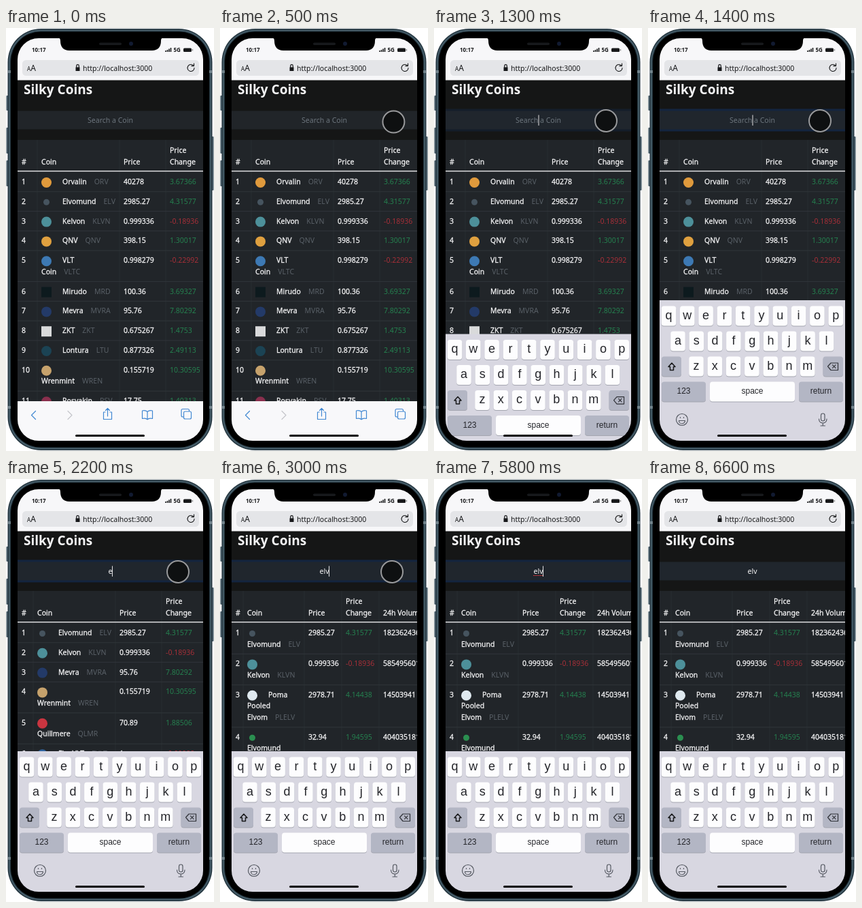
An HTML page for the animation above (6700 ms loop, 306 px wide and 620 px high).

```html
<!DOCTYPE html>
<html lang="en">
<head>
<meta charset="utf-8">
<title>Coin search on a phone</title>
<style>
  html, body { margin: 0; width: 100%; height: 100%; overflow: hidden; background: #fff; }
  svg { display: block; width: 306px; height: 620px; }
  text { font: 500 10.5px "Noto Sans", "Open Sans", sans-serif; fill: #f4f4f5; white-space: pre; }
  .title { font-size: 19px; font-weight: 600; }
  .strong { stroke: #f4f4f5; stroke-width: .28; }
  .ticker { fill: #596067; font-weight: 400; stroke: none; }
  .up { fill: #25804f; font-weight: 400; }
  .down { fill: #a52f38; font-weight: 400; }
  .ui { fill: #17181a; font-weight: 400; }
  .status { font-size: 8px; font-weight: 700; fill: #17181a; }
  .key { font: 18px "Liberation Sans", Arial, sans-serif; fill: #24252a; text-anchor: middle; }
  .label { font: 12px "Liberation Sans", Arial, sans-serif; fill: #24252a; text-anchor: middle; }
  .query { text-anchor: middle; font-weight: 400; }
  .line { fill: none; stroke-linecap: round; stroke-linejoin: round; }
</style>
</head>
<body>
<svg viewBox="0 0 306 620">
  <defs>
    <clipPath id="screen"><rect x="17" y="15" width="273" height="590" rx="31"/></clipPath>
  </defs>

  <g fill="#4a5f6a">
    <rect x="0.5" y="99" width="5" height="22" rx="1"/>
    <rect x="0.5" y="146" width="5" height="38" rx="1"/>
    <rect x="0.5" y="194" width="5" height="38" rx="1"/>
    <rect x="301" y="159" width="4.5" height="79" rx="1"/>
  </g>
  <rect x="2.5" y="1" width="301" height="618" rx="49" fill="#263842"/>
  <rect x="5" y="3.5" width="296" height="613" rx="46.5" fill="none" stroke="#4b626e" stroke-width="1.5"/>
  <path d="M3 64h4M299 64h4M3 556h4M299 556h4" stroke="#71838c" stroke-width="4"/>
  <rect x="7" y="5.5" width="292" height="609" rx="44" fill="#000"/>

  <g clip-path="url(#screen)">
    <rect x="17" y="15" width="273" height="590" fill="#151616"/>
    <text class="title" x="26" y="97">Silky Coins</text>
    <rect id="ring" x="17" y="118.5" width="273" height="33" fill="#14253f"/>
    <rect id="field" x="17" y="121.5" width="273" height="27" fill="#212529"/>
    <text id="query" class="query" x="153.5" y="139"></text>
    <path id="spelling" class="line" stroke="#d3343c" stroke-dasharray="1.5 1.5"/>
    <rect id="caret" y="127.5" width="1" height="15.5" fill="#e4e4e6"/>
    <g id="table"></g>

    <rect x="17" y="15" width="273" height="61.5" fill="#f7f7f9"/>
    <rect x="24" y="47" width="260" height="23" rx="5.5" fill="#e4e5e8"/>
    <text class="ui" x="31" y="63"><tspan font-size="8">A</tspan><tspan font-size="12">A</tspan></text>
    <path d="M102.5 57.5h6v5.5h-6z" fill="#17181a"/>
    <path class="line" d="M103.7 57.5v-2a1.8 1.8 0 0 1 3.6 0v2" stroke="#17181a" stroke-width="1.2"/>
    <text class="ui" x="113" y="62.5">http://localhost:3000</text>
    <path class="line" d="M276 55.5a5 5 0 1 0 1 3M276.5 52v3.6h-3.6" stroke="#17181a" stroke-width="1.1"/>

    <text class="status" x="38" y="35">10:17</text>
    <path d="M235 35v-2M237.5 35v-3M240 35v-4.5M242.5 35v-6" stroke="#17181a" stroke-width="1.6"/>
    <text class="status" x="246.5" y="35">5G</text>
    <rect x="261" y="29.5" width="12" height="5.5" rx="1.5" fill="#17181a"/>
    <path d="M274.5 31v2.5" stroke="#777"/>

    <g id="toolbar">
      <rect x="17" y="547" width="273" height="58" fill="#f8f8fa"/>
      <g class="line" stroke="#4087d2" stroke-width="1.2">
        <path d="M43.5 561.5l-6 6 6 6"/>
        <path d="M91 561.5l6 6-6 6" stroke="#c4c6cb"/>
        <path d="M146 563h-2.500v10.500h12V563H153M149.500 569v-11.500M146.500 560.500l3-3 3 3"/>
        <path d="M208 562.500c-2-2-5-2-7.500-1.500v11.500c3-.7 6-.4 7.500 1.300c1.500-1.700 4.500-2 7.500-1.300V561c-2.500-.5-5.500-.5-7.500 1.500zv11"/>
        <rect x="261.5" y="562" width="11" height="11" rx="2"/>
        <path d="M261 570h-1a2 2 0 0 1-2-2v-7.500a2 2 0 0 1 2-2h7.500a2 2 0 0 1 2 2v1"/>
      </g>
    </g>
    <g id="keyboard"></g>
    <rect x="102" y="596" width="102" height="3" rx="1.5" fill="#050505"/>
    <circle id="pointer" r="16" fill="#0e1011" stroke="#98999b" stroke-width="2"/>
  </g>

  <path d="M75 14h158c-4 0-5 2-5 5 0 9-5 14-13 14H93c-8 0-13-5-13-14 0-3-1-5-5-5z" fill="#000"/>
  <rect x="137" y="21.5" width="33" height="3.5" rx="1.7" fill="#17191c"/>
  <circle cx="184" cy="23" r="3" fill="#111a31"/>
</svg>

<script>
const $ = id => document.getElementById(id);
const LOOP = 6700;

// A bar in a name marks a line break; the icon takes the start of the first line.
const coins = [
  ["Orvalin", "ORV", "40278", "3.67366", "#e09a3c"],
  ["Elvomund", "ELV", "2985.27", "4.31577", "#46545f", "182362436"],
  ["Kelvon", "KLVN", "0.999336", "-0.18936", "#4d909a", "585495601"],
  ["QNV", "QNV", "398.15", "1.30017", "#dfa03f"],
  ["VLT|Coin", "VLTC", "0.998279", "-0.22992", "#3d79b4"],
  ["Mirudo", "MRD", "100.36", "3.69327", "#0d1a1e", "", true],
  ["Mevra", "MVRA", "95.76", "7.80292", "#233a68"],
  ["ZKT", "ZKT", "0.675267", "1.4753", "#d9dadb", "", true],
  ["Lontura", "LTU", "0.877326", "2.49113", "#1b4354"],
  ["|Wrenmint", "WREN", "0.155719", "10.30595", "#c6a26c"],
  ["Rosvakin", "RSV", "17.75", "1.40313", "#8a2f4d"],
  ["|Quillmere", "QLMR", "70.89", "1.88506", "#c93540"],
  ["FineVLT", "FVLT", "1", "-0.09988", "#2f64a0"],
  ["Poma|Pooled|Elvom", "PLELV", "2978.71", "4.14438", "#dfe9ef", "14503941"],
  ["|Elvomund|Classic", "ELVC", "32.94", "1.94595", "#2b8f50", "404035181"],
];
const smallIcons = ["ELV", "ELVC"];

const text = (x, y, s, cls = "strong") => `<text x="${x}" y="${y}" class="${cls}">${s}</text>`;
const rect = (x, y, w, h, fill, rx = 0) =>
  `<rect x="${x}" y="${y}" width="${w}" height="${h}" fill="${fill}" rx="${rx}"/>`;

function columnsFor(query) {
  if (query.length > 1) return { coin: 40, price: 130, change: 185, volume: 240 };
  return query ? { coin: 46, price: 167, change: 235 } : { coin: 52, price: 173, change: 241 };
}

function icon(x, y, color, ticker, square) {
  if (square) return rect(x, y - 7.5, 15, 15, color);
  const r = smallIcons.includes(ticker) ? 4.5 : 7.5;
  return `<circle cx="${x + 7.5}" cy="${y}" r="${r}" fill="${color}"/>`;
}

function tableMarkup(query) {
  const col = columnsFor(query);
  let out = rect(17, 164, 273, 441, "#212529");
  for (const x of Object.values(col)) out += rect(x - 6.5, 164, 1, 441, "#292e32");
  out += text(23, 199.5, "#") + text(col.coin, 199.5, "Coin") + text(col.price, 199.5, "Price")
    + text(col.change, 183, "Price") + text(col.change, 199.5, "Change");
  if (col.volume) out += text(col.volume, 199.5, "24h Volume");
  out += rect(17, 209, 273, 1.5, "#d9dadc");

  let top = 211;
  const matches = coins.filter(c => c[0].replaceAll("|", " ").toLowerCase().includes(query));
  matches.forEach(([name, ticker, price, change, color, volume, square], i) => {
    const lines = (col.volume && !name.includes("|") ? "|" + name : name).split("|");
    const base = top + 18;
    out += text(23, base, i + 1) + icon(col.coin, top + 15.5, color, ticker, square);
    lines.forEach((line, n) => {
      const tail = n === lines.length - 1 ? `<tspan dx="11" class="ticker">${ticker}</tspan>` : "";
      out += text(col.coin + (n ? 0 : 31), base + n * 16.6, line + tail);
    });
    out += text(col.price, base, price) + text(col.change, base, change, change < 0 ? "down" : "up");
    if (col.volume) out += text(col.volume, base, volume || "");
    top += 12.2 + 16.6 * lines.length;
    out += rect(17, top - 0.5, 273, 1, "#30353a");
  });
  return out;
}

function keyboardMarkup() {
  const WHITE = "#fdfdfe", GREY = "#b3b6c4";
  const key = (x, y, w, fill) => rect(x, y + 1, w, 29, "#a4a6b0", 4) + rect(x, y, w, 29, fill, 4);
  let out = rect(17, 399, 273, 206, "#d8d7e1");
  [["qwertyuiop", 30.5, 407.5], ["asdfghjkl", 44, 444.5], ["zxcvbnm", 71, 481.5]].forEach(([row, x0, y]) => {
    [...row].forEach((ch, i) => {
      const x = x0 + i * 27.3;
      out += key(x - 10.8, y, 21.6, WHITE) + text(x, y + 19, ch, "key");
    });
  });
  out += key(20, 481.5, 29, GREY) + key(257.5, 481.5, 29.5, GREY);
  [["123", 20, 65, GREY], ["space", 91, 125, WHITE], ["return", 222, 65, GREY]].forEach(([s, x, w, fill]) => {
    out += key(x, 518.5, w, fill) + text(x + w / 2, 536, s, "label");
  });
  return out + `
    <path class="line" d="M35 491l-5 5.500h2.500v5h5v-5h2.500z" stroke="#17181a" stroke-width="1.5"/>
    <path class="line" d="M264.500 496l4.500-5h10.500v10.500H269zM271.500 493.800l4.500 4.500m0-4.500l-4.500 4.500" stroke="#303238" stroke-width="1.2"/>
    <g class="line" stroke="#555962" stroke-width="1.2">
      <circle cx="50" cy="574" r="8.5"/>
      <path d="M45.500 575.500a4.500 4.500 0 0 0 9 0zM47.500 570.500v1M52.500 570.500v1"/>
      <rect x="254.5" y="565" width="5.5" height="11" rx="2.7"/>
      <path d="M251.500 573c0 8 11.500 8 11.500 0M257.250 579v4M254 583h6.500"/>
    </g>`;
}

function setQuery(query) {
  shownQuery = query;
  $("table").innerHTML = tableMarkup(query);
  $("query").textContent = query || "Search a Coin";
  $("query").style.fill = query ? "#f4f4f5" : "#6c757d";
  const half = $("query").getComputedTextLength() / 2;
  $("caret").setAttribute("x", query ? 153 + half : 153.5);
  $("spelling").setAttribute("d", `M${153.5 - half} 141.500h${half * 2}`);
}

const show = (id, opacity) => $(id).setAttribute("opacity", +opacity);
const between = (t, a, b) => t >= a && t < b;
const progress = (t, a, b) => Math.min(1, Math.max(0, (t - a) / (b - a)));
let shownQuery = null;

function draw(time) {
  const t = Math.floor(time % LOOP / 100) * 100;
  const query = "elv".slice(0, t < 1900 ? 0 : t < 2600 ? 1 : t < 3000 ? 2 : 3);
  if (query !== shownQuery) setQuery(query);

  show("toolbar", t < 1200);
  show("keyboard", t >= 1200);
  const drop = 161 * (1 - progress(t, 1200, 1400)) ** 1.7;
  $("keyboard").setAttribute("transform", `translate(0 ${drop})`);

  show("ring", progress(t, 1200, 1400) * (1 - progress(t, 6400, 6600)));
  $("field").setAttribute("fill", t >= 1300 ? "#20262d" : "#212529");
  show("caret", between(t, 1200, 4000) || between(t, 4400, 5100) || between(t, 5800, 6500));
  show("spelling", between(t, 3700, 6500));

  const away = (1 - progress(t, 100, 600)) ** 2;
  $("pointer").setAttribute("cx", 253 + 60 * away);
  $("pointer").setAttribute("cy", 136 + 40 * away);
  show("pointer", !between(t, 200, 3700) ? 0 : t >= 3300 ? 0.5 : 1);
}

$("keyboard").innerHTML = keyboardMarkup();
const start = performance.now();
function tick() {
  draw(performance.now() - start);
  requestAnimationFrame(tick);
}
tick();
</script>
</body>
</html>
```
